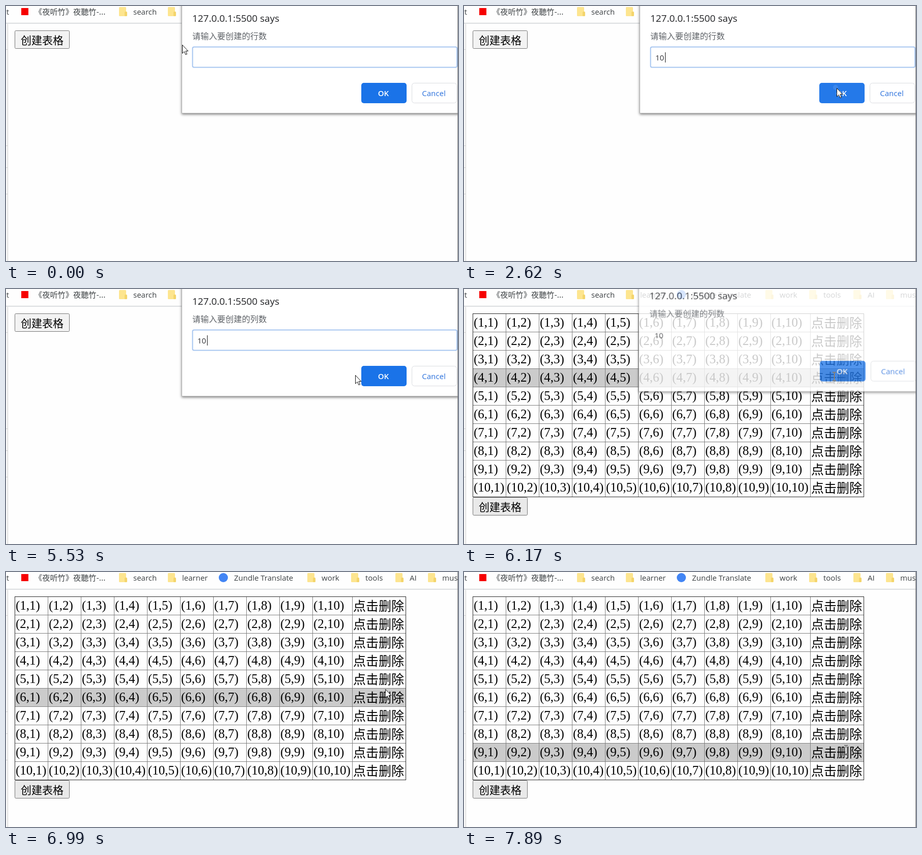
Animation of 888 by 501 pixels, one loop 8000 ms. Source, as an HTML page with a canvas:

```html
<!DOCTYPE html>
<html lang="zh">
<head>
<meta charset="utf-8">
<title>创建表格</title>
<style>
html, body { margin: 0; width: 100%; height: 100%; overflow: hidden; background: #fefefe; }
canvas { display: block; }
</style>
</head>
<body>
<canvas id="stage" width="888" height="501"></canvas>
<script>
const stage = document.getElementById('stage');
const page = stage.getContext('2d');
const layer = document.createElement('canvas');
layer.width = stage.width;
layer.height = stage.height;
const overlay = layer.getContext('2d');
let ctx = page;

const LOOP = 8000;
const STEP = 130;
const BLINK = 430;
const ROW = 36;
const UI = '"Open Sans", "Noto Sans CJK SC", "Noto Sans CJK", sans-serif';
const CJK = '"Noto Sans CJK SC", "Noto Sans CJK", sans-serif';
const SERIF = '"Liberation Serif", serif';

const PROMPTS = [
  { unit: '行', open: -BLINK, keys: [1200, 1350], press: 2620, close: 2770, end: 2890 },
  { unit: '列', open: 2890, keys: [4170, 4420], press: 6050, close: 6170, end: 6320 }
];
const TABLE_AT = PROMPTS[1].close;

// The pointer glides in even steps from one stop to the next.
const START = { x: 346, y: 76 };
const MOVES = [
  { from: 120, to: 360, x: 398, y: 101 },
  { from: 1780, to: 2620, x: 732, y: 161 },
  { from: 2890, to: 3310, x: 400, y: 101 },
  { from: 5010, to: 5530, x: 686, y: 169 },
  { from: 5650, to: 6050, x: 727, y: 172 },
  { from: 6720, to: 6990, x: 745, y: 230 },
  { from: 7110, to: 7890, x: 750, y: 349 }
];
const FOLDERS = [
  [222, 'search'], [318, 'learner'], [592, 'work'], [678, 'tools'], [765, 'AI'], [829, 'music']
];

const inside = (p, left, top, right, bottom) =>
  p.x >= left && p.x < right && p.y >= top && p.y < bottom;

function pointerAt(t) {
  let { x, y } = START;
  for (const move of MOVES) {
    if (t < move.from) break;
    const span = move.to - move.from;
    const steps = Math.round(span / STEP) + 1;
    const done = Math.floor((t - move.from) * (steps - 1) / span) + 1;
    const p = Math.min(1, done / steps);
    x = Math.round(x + (move.x - x) * p);
    y = Math.round(y + (move.y - y) * p);
  }
  return { x, y };
}

function rect(x, y, w, h, color) {
  ctx.fillStyle = color;
  ctx.fillRect(x, y, w, h);
}

function box(x, y, w, h, radius, fill, stroke, line = 1) {
  ctx.beginPath();
  ctx.roundRect(x, y, w, h, radius);
  ctx.fillStyle = fill;
  ctx.fill();
  if (!stroke) return;
  ctx.strokeStyle = stroke;
  ctx.lineWidth = line;
  ctx.stroke();
}

function disc(x, y, r, color) {
  ctx.beginPath();
  ctx.arc(x, y, r, 0, Math.PI * 2);
  ctx.fillStyle = color;
  ctx.fill();
}

function text(str, x, y, size, color, family = UI, weight = 400, align = 'left') {
  ctx.font = `${weight} ${size}px ${family}`;
  ctx.textAlign = align;
  ctx.fillStyle = color;
  ctx.fillText(str, x, y);
}

function drawBrowser() {
  rect(0, 0, 888, 501, '#fefefe');
  rect(0, 33, 888, 1, '#d0d3d6');
  rect(0, 34, 888, 1, '#e6e8ea');
  rect(0, 35, 3, 466, '#f9f9f9');
  rect(3, 35, 1, 466, '#cfcfcf');
  for (const y of [85, 274, 317, 369]) rect(0, y, 3, 1, '#d2d2d2');

  const ink = '#3c4043';
  text('ot', 6, 17, 15, ink, UI, 400, 'right');
  rect(30, 4, 14, 14, '#f60000');
  text('《夜听竹》夜聽竹-...', 56, 17, 15.2, ink, CJK);
  for (const [x, name] of FOLDERS) {
    box(x, 2, 14, 18, 1.5, '#fde58f');
    box(x + 11, 11, 5, 9, 1.5, '#f4d56c');
    text(name, x + 28, 17, 15, ink);
  }
  disc(427, 11, 9, '#4285f4');
  text('Zundle Translate', 448, 17, 15, ink);
}

function drawPageButton(y, fill) {
  box(17.5, y + .5, 107, 35, 2, fill, '#767676');
  text('创建表格', 29, y + 27, 21, '#000', CJK);
}

function drawTable(hoverRow) {
  rect(18, 49 + hoverRow * ROW, 767, ROW - 1, '#cbcbcb');
  const columnX = col => 17 + col * 65 + (col === 10 ? 13 : 0);
  for (let i = 1; i <= 10; i++) {
    rect(columnX(i), 48, 1, 10 * ROW, '#808080');
    rect(17, 48 + i * ROW, 768, 1, '#808080');
  }
  ctx.strokeStyle = '#2a2a2a';
  ctx.lineWidth = 1;
  ctx.strokeRect(17.5, 48.5, 768, 10 * ROW);
  for (let row = 0; row < 10; row++) {
    const y = 74 + row * ROW;
    for (let col = 0; col < 10; col++) {
      text(`(${row + 1},${col + 1})`, columnX(col) + 2, y, 25, '#000', SERIF);
    }
    text('点击删除', columnX(10) + 2, y + 2, 25, '#000', CJK);
  }
}

function drawInput(prompt, t) {
  const keys = prompt.keys.filter(key => t >= key);
  const typed = '10'.slice(0, keys.length);
  const closing = t >= prompt.close;
  if (!closing) box(366.5, 80.5, 519.5, 40, 3, '#fff', '#a6c5f0', 2);
  text(typed, 376, 107, 15, '#303135');
  const sinceEdit = t - (keys.at(-1) ?? prompt.open);
  const lit = Math.floor(sinceEdit / BLINK) % 2 === 0;
  if (lit && !closing) rect(376 + Math.round(typed.length * 9.5), 91, 1, 20, '#111');
}

function drawDialog(prompt, t, pointer) {
  ctx.save();
  ctx.shadowColor = 'rgba(0,0,0,.5)';
  ctx.shadowBlur = 5;
  ctx.shadowOffsetY = 2;
  rect(345, -20, 580, 231, '#b4b4b4');
  ctx.restore();
  rect(346, -20, 580, 230, '#fff');

  text('127.0.0.1:5500 says', 366, 31, 18.9, '#202124');
  text(`请输入要创建的${prompt.unit}数`, 366, 65, 16.25, '#5f6368', CJK);
  drawInput(prompt, t);

  const hover = inside(pointer, 698, 151, 787, 191);
  box(698, 151, 89, 40, 5, hover ? '#2479e9' : '#1a73e8');
  if (t >= prompt.press && t < prompt.close) disc(pointer.x - 2, pointer.y - 1, 5, '#3b87ec');
  text('OK', 741.5, 177, 15, '#fff', UI, 600, 'center');
  box(797.5, 151.5, 88, 39, 5, '#fff', '#dadce0');
  text('Cancel', 840.5, 177, 15, '#2a70dc', UI, 400, 'center');
}

// A closing dialog fades as one sheet while it grows and lifts slightly.
function showDialog(prompt, t, pointer) {
  overlay.clearRect(0, 0, layer.width, layer.height);
  ctx = overlay;
  drawDialog(prompt, t, pointer);
  ctx = page;
  ctx.save();
  if (t >= prompt.close) {
    ctx.globalAlpha = .79;
    ctx.translate(-4.9, -11.1);
    ctx.scale(1.0085, 1.0085);
  }
  ctx.drawImage(layer, 0, 0);
  ctx.restore();
}

function drawArrow(x, y) {
  const points = [[0, 0], [0, 16.5], [3.8, 13], [6.4, 19], [9, 18], [6.5, 12], [11.3, 12]];
  ctx.beginPath();
  for (const [dx, dy] of points) ctx.lineTo(x + .5 + dx, y + .5 + dy);
  ctx.closePath();
  ctx.fillStyle = '#fff';
  ctx.fill();
  ctx.strokeStyle = '#111';
  ctx.lineWidth = 1;
  ctx.stroke();
}

// The text pointer inverts whatever lies below it.
function drawBeam(x, y) {
  ctx.save();
  ctx.globalCompositeOperation = 'difference';
  rect(x, y - 8, 1, 16, '#fff');
  for (const edge of [y - 9, y + 8]) {
    rect(x - 3, edge, 3, 1, '#fff');
    rect(x + 1, edge, 3, 1, '#fff');
  }
  ctx.restore();
}

function drawPointer(t, pointer) {
  const offset = (pointer.y - 48) % ROW;
  const overText = t < TABLE_AT
    ? inside(pointer, 366, 80, 887, 121)
    : offset > 3 && offset < ROW - 3;
  (overText ? drawBeam : drawArrow)(pointer.x, pointer.y);
}

function draw(t) {
  const pointer = pointerAt(t);
  const prompt = PROMPTS.find(({ end }) => t < end);
  drawBrowser();
  if (t < TABLE_AT) {
    drawPageButton(48, '#f3f3f3');
  } else {
    drawTable(Math.floor((pointer.y - 48) / ROW));
    drawPageButton(409, '#e9e9e9');
  }
  if (prompt) showDialog(prompt, t, pointer);
  rect(887, 0, 1, 501, '#7c7c7c');
  drawPointer(t, pointer);
}

function tick() {
  draw(performance.now() % LOOP);
  requestAnimationFrame(tick);
}
tick();
</script>
</body>
</html>
```
